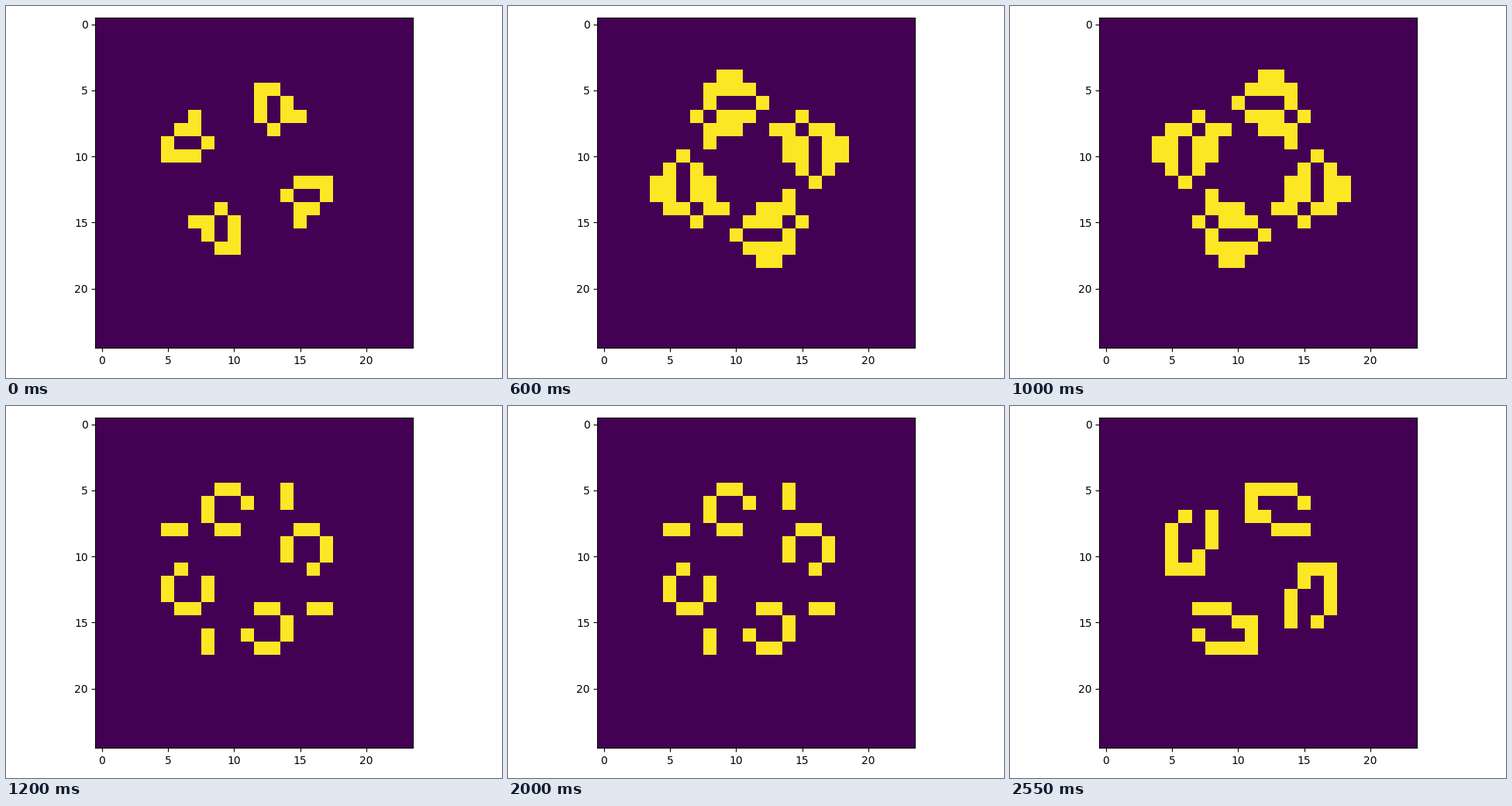
A matplotlib script for the animation above (2.6 s loop, 640x480 px).

```python
import matplotlib.pyplot as plt
import numpy as np
from matplotlib.animation import FuncAnimation

ROWS, COLS = 25, 24
CENTRE = 11
FRAMES, INTERVAL = 52, 50

# One quarter of the oscillator, as (row, column) offsets from the centre.
ARM = [(-6, 1), (-6, 2), (-5, 1), (-5, 3), (-4, 1), (-4, 3), (-4, 4), (-3, 2)]


def seed_grid():
    grid = np.zeros((ROWS, COLS), dtype=int)
    for r, c in ARM:
        for _ in range(4):
            grid[CENTRE + r, CENTRE + c] = 1
            r, c = -c, r
    return grid


def step(grid):
    """Advance one generation of the Game of Life."""
    near = sum(
        np.roll(grid, (dr, dc), axis=(0, 1))
        for dr in (-1, 0, 1)
        for dc in (-1, 0, 1)
        if (dr, dc) != (0, 0)
    )
    return ((near == 3) | ((grid == 1) & (near == 2))).astype(int)


# The first generation is shown twice before the motion starts.
states = [seed_grid()] * 2
while len(states) < FRAMES:
    states.append(step(states[-1]))

fig, ax = plt.subplots(figsize=(6.4, 4.8), dpi=100)
image = ax.imshow(states[0], cmap="viridis", vmin=0, vmax=1, interpolation="nearest")
fig.tight_layout()


def draw(i):
    image.set_data(states[i])
    return [image]


anim = FuncAnimation(
    fig, draw, frames=FRAMES, interval=INTERVAL, init_func=lambda: draw(0),
    repeat=True, repeat_delay=0, blit=False,
)

plt.show()
```
